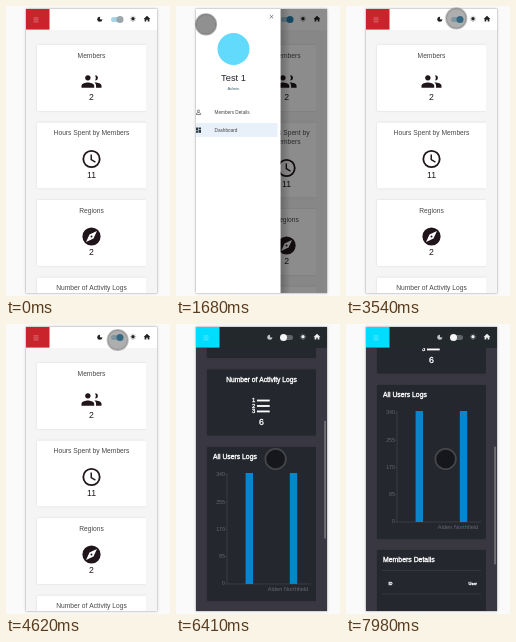
Recreate the animation shown at these times as an HTML page with a canvas. Size 164 px wide and 290 px high, loop 8 s.

```html
<!DOCTYPE html>
<html lang="en">
<head>
<meta charset="utf-8">
<title>Dashboard walkthrough</title>
<style>
html, body { margin: 0; width: 164px; height: 290px; overflow: hidden; background: #fafafa; }
canvas { display: block; width: 164px; height: 290px; }
</style>
</head>
<body>
<canvas id="stage" width="164" height="290"></canvas>
<script>
const LOOP = 8000;
const g = document.getElementById('stage').getContext('2d');
const FONT = '"Liberation Sans", Arial, sans-serif';
const APP = { x: 20, y: 3, w: 131, h: 284 };
const HEADER_BOTTOM = 24, DRAWER_W = 94;

// Each key is [time, ...values]; values between keys are linear.
const CURSOR = [
  [130, 93, 236], [380, 91, 194], [520, 90.5, 193], [1310, 31, 20], [1370, 30, 18.3],
  [2300, 30, 18.3], [2470, 86, 17], [2780, 112, 12.5], [2950, 112, 12.5], [3090, 109, 12.5],
  [3500, 109, 12.5], [4010, 125, 12], [4160, 131, 11.5], [4440, 131, 11.5],
  [4620, 111.7, 16], [5260, 111.7, 16], [5640, 111.7, 103], [5740, 111.7, 103], [6100, 99.6, 135]
];
const SCROLL = [
  [5560, 0], [5720, 21], [6100, 165], [6260, 222], [6410, 226], [6970, 238],
  [7120, 242], [7280, 262], [7580, 266], [7850, 266], [7980, 288]
];

const clamp = v => Math.max(0, Math.min(1, v));
const span = (t, a, b) => clamp((t - a) / (b - a));
const smooth = p => p * p * (3 - 2 * p);
const easeOut = p => 1 - (1 - p) ** 3;

function track(keys, t) {
  const i = keys.findIndex(k => k[0] > t);
  if (i === 0) return keys[0].slice(1);
  if (i < 0) return keys[keys.length - 1].slice(1);
  const a = keys[i - 1], b = keys[i], p = span(t, a[0], b[0]);
  return a.slice(1).map((v, n) => v + (b[n + 1] - v) * p);
}

function mix(a, b, p) {
  const part = (c, i) => parseInt(c.slice(i, i + 2), 16);
  return 'rgb(' + [1, 3, 5].map(i => Math.round(part(a, i) + (part(b, i) - part(a, i)) * p)) + ')';
}

function palette(k) {
  const c = (a, b) => mix(a, b, k);
  return {
    dark: k,
    bg: c('#f5f5f5', '#393741'), card: c('#ffffff', '#25272e'), bar: c('#ffffff', '#23282c'),
    brand: c('#c9232c', '#00ddff'), text: c('#4b4648', '#ffffff'), icon: c('#20151a', '#ffffff'),
    head: c('#222222', '#eeeeee'), moon: c('#222222', '#c4c6c8'),
    axis: c('#999999', '#43464d'), label: c('#777777', '#64686f')
  };
}

function rect(x, y, w, h, color) {
  g.fillStyle = color;
  g.fillRect(x, y, w, h);
}

function disc(x, y, r, color) {
  g.fillStyle = color;
  g.beginPath();
  g.arc(x, y, r, 0, 7);
  g.fill();
}

function line(color, width, ...points) {
  g.strokeStyle = color;
  g.lineWidth = width;
  g.beginPath();
  points.forEach(([x, y]) => g.lineTo(x, y));
  g.stroke();
}

function pill(x, y, w, h, r, color) {
  g.fillStyle = color;
  g.beginPath();
  g.roundRect(x, y, w, h, r);
  g.fill();
}

function text(s, x, y, size, color, align = 'left', bold = 0) {
  g.font = `${size}px ${FONT}`;
  g.textAlign = align;
  g.textBaseline = 'middle';
  g.fillStyle = g.strokeStyle = color;
  g.fillText(s, x, y);
  if (bold) {
    g.lineWidth = 0.35 * bold;
    g.strokeText(s, x, y);
  }
}

function clipped(x, y, w, h, draw) {
  g.save();
  g.beginPath();
  g.rect(x, y, w, h);
  g.clip();
  draw();
  g.restore();
}

function wrap(s, width) {
  g.font = `6.7px ${FONT}`;
  return s.split(' ').reduce((rows, word) => {
    const last = rows.length - 1;
    const joined = last < 0 ? word : rows[last] + ' ' + word;
    if (last >= 0 && g.measureText(joined).width <= width) rows[last] = joined;
    else rows.push(word);
    return rows;
  }, []);
}

// Icons are drawn on a 24 unit grid centred on 0,0.
const person = new Path2D('M-4-7a3 3 0 1 0 .01 0zM-11 7v-2.5c0-2.3 4.7-3.5 7-3.5s7 1.2 7 3.5V7z');
const icons = {
  people(c) {
    g.fillStyle = c;
    g.fill(person);
    g.fill(new Path2D('M4-7a3 3 0 1 1-.01 6a6 6 0 0 0 0-6zM4 1c3 0 7 1.2 7 3.5V7H5v-2.5c0-1.5-.8-2.6-2-3.4z'));
  },
  clock(c) {
    g.strokeStyle = c;
    g.lineWidth = 2;
    g.beginPath();
    g.arc(0, 0, 9, 0, 7);
    g.stroke();
    line(c, 1.6, [-0.3, -5], [-0.3, 0.6], [4.3, 3.3]);
  },
  compass(c, card) {
    disc(0, 0, 10, c);
    g.fillStyle = card;
    g.fill(new Path2D('M6-6L2.2 2.2L-6 6L-2.2-2.2z'));
    disc(0, 0, 1.1, c);
  },
  list(c) {
    [-6, 0, 6].forEach((y, i) => {
      rect(-5, y - 1, 14, 2, c);
      text(i + 1, -8.5, y, 6.5, c, 'center', 1);
    });
  }
};

const CARDS = [
  ['Members', 'people', 2], ['Hours Spent by Members', 'clock', 11],
  ['Regions', 'compass', 2], ['Number of Activity Logs', 'list', 6]
];

function panel(x, y, w, h, p) {
  g.save();
  g.shadowColor = 'rgba(0,0,0,.16)';
  g.shadowBlur = 2;
  pill(x, y, w, h, 1, p.card);
  g.restore();
}

function statCard([title, icon, count], x, y, w, p) {
  const rows = wrap(title, w - 8), extra = (rows.length - 1) * 9, cx = x + w / 2;
  panel(x, y, w, 66 + extra, p);
  rows.forEach((row, i) => text(row, cx, y + 11 + i * 9, 6.7, p.text, 'center', p.dark));
  g.save();
  g.translate(cx, y + 36.5 + extra);
  g.scale(0.91, 0.91);
  icons[icon](p.icon, p.card);
  g.restore();
  text(count, cx, y + 53 + extra, 8.7, p.icon, 'center', p.dark);
  return 77.5 + extra;
}

function chartCard(x, y, w, p) {
  panel(x, y, w, 154, p);
  text('All Users Logs', x + 6, y + 10.5, 6.8, p.text, 'left', p.dark);
  const base = y + 137, left = x + 20;
  for (let i = 0; i < 5; i++) {
    const ly = base - i * 27.3;
    text(i * 85, left - 2, ly, 5.3, p.label, 'right');
    line(p.axis, 0.6, [left - 2, ly], [left, ly]);
  }
  line(p.axis, 0.7, [left, y + 26], [left, base], [left + 84, base]);
  for (const dx of [18.6, 62.8]) rect(left + dx, y + 26, 7.4, 111, '#0886cd');
  text('Alden Northfield', left + 61, y + 142, 5.7, p.label, 'center');
}

function tableCard(x, y, w, p) {
  panel(x, y, w, 160, p);
  text('Members Details', x + 6, y + 10.5, 6.9, p.text, 'left', p.dark);
  line(p.axis, 0.5, [x + 5, y + 20.5], [x + w - 5, y + 20.5]);
  text('ID', x + 11.5, y + 34, 4, p.text, 'left', p.dark);
  text('User', x + 91.5, y + 34, 4, p.text, 'left', p.dark);
  line(p.axis, 0.5, [x + 5, y + 44], [x + w - 5, y + 44]);
}

function content(shift, scroll, p) {
  const x = 31 + shift, room = 140 - x, w = Math.max(room, 38);
  clipped(x - 2, HEADER_BOTTOM, room + 2, 263, () => {
    let y = 39 - scroll;
    for (const card of CARDS) y += statCard(card, x, y, w, p);
    chartCard(x, y, w, p);
    tableCard(x, y + 165, w, p);
  });
}

function header(p, t) {
  rect(20, 3, 131, 21, p.bar);
  rect(20, 3, 23.5, 20.6, p.brand);
  for (const y of [11.5, 13.5, 15.5]) rect(27.5, y, 5, 0.8, 'rgba(255,255,255,.42)');

  disc(93.8, 13.3, 2.5, p.moon);
  disc(95.5, 11.9, 1.7, p.bar);

  pill(105, 11, 12, 5, 2.5, mix('#a9d3e6', '#60656a', p.dark));
  disc(114 - 6.5 * p.dark, 13.5, 3.5, mix(t < 1500 ? '#9aa6ac' : '#2482ae', '#f5f5f5', p.dark));

  disc(127, 12.8, 1.7, p.head);
  for (let i = 0; i < 8; i++) {
    const a = i * Math.PI / 4;
    disc(127 + 2.7 * Math.cos(a), 12.8 + 2.7 * Math.sin(a), 0.4, p.head);
  }
  g.fillStyle = p.head;
  g.fill(new Path2D('M141 9.8l3.4 3.2h-1v2.6h-1.7v-1.9h-1.4v1.9h-1.7v-2.6h-1z'));
}

function drawer(open) {
  const right = 20 + DRAWER_W * open;
  rect(20, 3, 131, 284, `rgba(0,0,0,${0.5 * open})`);
  const shade = g.createLinearGradient(right, 0, right + 10, 0);
  shade.addColorStop(0, `rgba(0,0,0,${0.25 * open})`);
  shade.addColorStop(1, 'rgba(0,0,0,0)');
  rect(right, 3, 10, 284, shade);

  g.save();
  g.translate(right - 114, 0);
  rect(20, 3, DRAWER_W, 284, '#ffffff');
  line('#555555', 0.7, [103.3, 9], [106.7, 12.4]);
  line('#555555', 0.7, [106.7, 9], [103.3, 12.4]);
  disc(67, 43, 16, '#61dafb');
  text('Test 1', 67, 72, 9.3, '#27222f', 'center');
  text('Admin', 67, 83, 4.2, '#3d6673', 'center');

  rect(23, 117, 88, 14, '#e8f0fa');
  rect(23, 117, 1, 14, '#26303a');
  g.save();
  g.translate(33.2, 106.3);
  g.scale(0.32, 0.32);
  g.strokeStyle = '#444444';
  g.lineWidth = 2;
  g.stroke(person);
  g.restore();
  for (const [x, y, h] of [[29, 121.5, 3], [29, 125, 1.8], [32, 121.5, 1.8], [32, 123.8, 3]])
    rect(x, y, 2.5, h, '#2c3c46');
  text('Members Details', 48, 106.6, 4.7, '#444444');
  text('Dashboard', 48, 124.4, 4.7, '#444444');
  g.restore();
}

function cursor(t, dark) {
  if (t < 130) return;
  const [x, y] = track(CURSOR, t);
  const pressed = (t >= 1370 && t < 1530) || (t >= 4790 && t < 4930);
  const r = pressed ? 11 : 10.2;
  const overDrawer = t >= 1370 && t < 3230;
  g.save();
  g.globalAlpha = (overDrawer ? 0.62 : 0.45) + 0.07 * dark;
  disc(x, y, r, mix('#4c4c4c', '#0a0a0c', dark));
  g.strokeStyle = mix('#767676', '#6a6a6a', dark);
  g.lineWidth = 1.8;
  g.beginPath();
  g.arc(x, y, r, 0, 7);
  g.stroke();
  g.restore();
}

function draw(t) {
  const p = palette(smooth(span(t, 4900, 5160)));
  const open = easeOut(span(t, 1510, 1830)) * (1 - smooth(span(t, 3210, 3470)));
  const shift = DRAWER_W * smooth(span(t, 1540, 1810)) * (1 - smooth(span(t, 3230, 3500)));
  const [scroll] = track(SCROLL, t);

  rect(0, 0, 164, 290, '#fafafa');
  g.save();
  g.shadowColor = 'rgba(0,0,0,.22)';
  g.shadowBlur = 3;
  rect(APP.x, APP.y, APP.w, APP.h, p.bg);
  g.restore();

  clipped(APP.x, APP.y, APP.w, APP.h, () => {
    content(shift, scroll, p);
    if (scroll > 0) pill(148.2, 3 + scroll * 0.415, 1.7, 118, 0.8, '#74747b');
    header(p, t);
    if (open > 0) drawer(open);
  });
  g.strokeStyle = 'rgba(0,0,0,.12)';
  g.lineWidth = 0.6;
  g.strokeRect(APP.x - 0.3, APP.y - 0.3, APP.w + 0.6, APP.h + 0.6);
  cursor(t, p.dark);
}

const start = performance.now();
function tick() {
  draw((performance.now() - start) % LOOP);
  requestAnimationFrame(tick);
}
tick();
</script>
</body>
</html>
```
